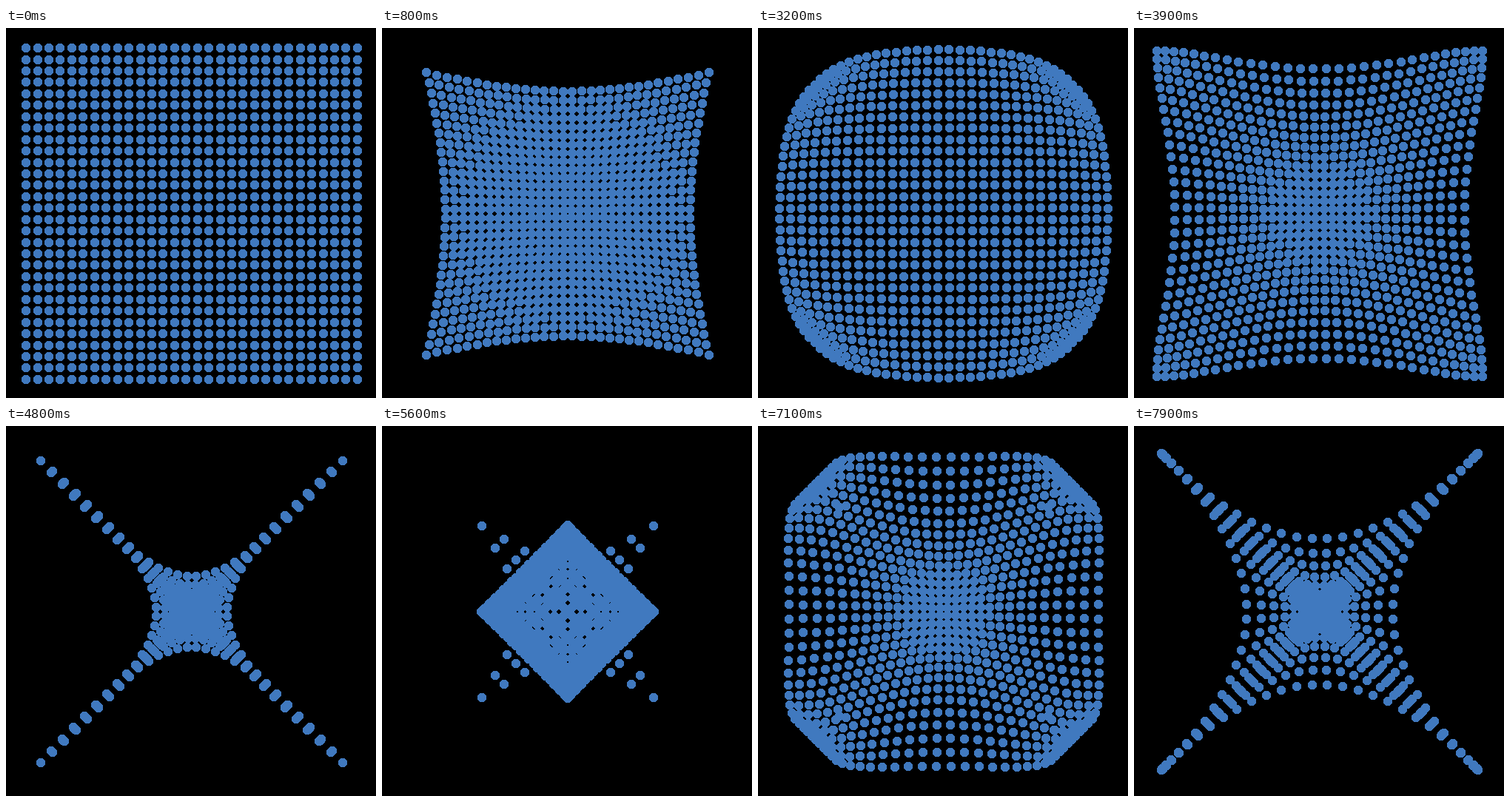
Animation, 500 px wide and 500 px high, one loop 8 s. Source, as an HTML page with a canvas:

```html
<!DOCTYPE html>
<html lang="en">
<head>
<meta charset="utf-8">
<title>Pendulum lattice</title>
<style>
  html, body { margin: 0; width: 100%; height: 100%; overflow: hidden; background: #000; }
  canvas { display: block; width: 500px; height: 500px; }
</style>
</head>
<body>
<canvas id="stage" width="500" height="500"></canvas>
<script>
const ctx = document.getElementById('stage').getContext('2d');
const N = 30, CENTER = 251, SCALE = 223.88;
const SIZE = 12, CUT = 3;
const STEP = 100, FRAMES = 80;

// Swing of an undamped pendulum released from rest, sampled once per step (RK4).
function swing(start) {
  const path = [start], sub = 5, h = STEP / 1000 / sub;
  let a = start, w = 0;
  for (let n = 1; n < FRAMES; n++) {
    for (let s = 0; s < sub; s++) {
      const a1 = w, w1 = -Math.sin(a);
      const a2 = w + w1 * h / 2, w2 = -Math.sin(a + a1 * h / 2);
      const a3 = w + w2 * h / 2, w3 = -Math.sin(a + a2 * h / 2);
      const a4 = w + w3 * h, w4 = -Math.sin(a + a3 * h);
      a += (a1 + 2 * a2 + 2 * a3 + a4) * h / 6;
      w += (w1 + 2 * w2 + 2 * w3 + w4) * h / 6;
    }
    path.push(a);
  }
  return path;
}

// One pendulum for every diagonal of the grid, from -2 to 2 radians.
const last = N - 1;
const swings = Array.from({ length: 2 * N - 1 }, (_, k) => swing((k - last) * 2 / last));

// Hard-edged dot on whole pixels, its corners cut in single-pixel stairs.
function dot(x, y) {
  const left = Math.round(x) - SIZE / 2, top = Math.round(y) - SIZE / 2;
  for (let c = 0; c <= CUT; c++) {
    const d = CUT - c;
    ctx.fillRect(left + c, top + d, SIZE - 2 * c, SIZE - 2 * d);
  }
}

function draw(n) {
  ctx.fillStyle = '#000';
  ctx.fillRect(0, 0, 500, 500);
  ctx.fillStyle = '#4079bf';
  for (let i = 0; i < N; i++) {
    for (let j = 0; j < N; j++) {
      const u = swings[i + j][n], v = swings[i - j + last][n];
      dot(CENTER + SCALE * (u + v) / 2, CENTER + SCALE * (u - v) / 2);
    }
  }
}

let shown = -1;
const begin = performance.now();

function tick() {
  const n = Math.floor((performance.now() - begin) / STEP) % FRAMES;
  if (n !== shown) draw(shown = n);
  requestAnimationFrame(tick);
}
tick();
</script>
</body>
</html>
```
